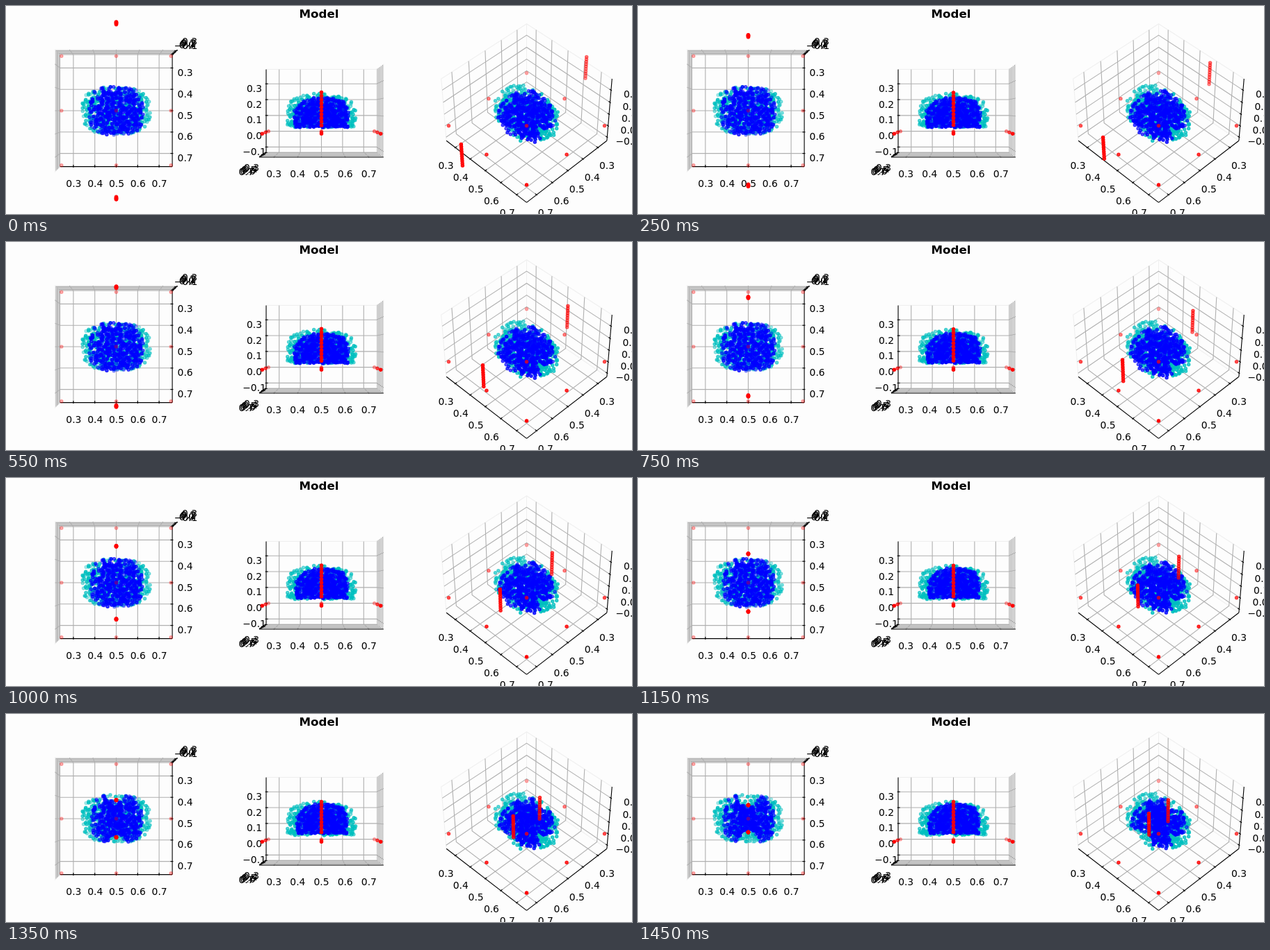
These frames come from a looping animation (900 px wide and 300 px high, 1500 ms). An HTML page with a canvas:

```html
<!DOCTYPE html>
<html lang="en">
<head>
<meta charset="utf-8">
<title>Model</title>
<style>
  html, body { margin: 0; width: 100%; height: 100%; overflow: hidden; background: #fdfdfd; }
  canvas { display: block; }
</style>
</head>
<body>
<canvas id="stage" width="900" height="300"></canvas>
<script>
const ctx = document.getElementById('stage').getContext('2d');
const STEP_MS = 50, STEPS = 30;
const FOCAL = 1438, DISTANCE = 10, SCALE = 2.237;
const CENTER = [0.5, 0.5, 0.13], HALF = 0.2615;
const LOW = CENTER.map(c => c - HALF), HIGH = CENTER.map(c => c + HALF);
const TICKS = [[0.3, 0.4, 0.5, 0.6, 0.7], [0.3, 0.4, 0.5, 0.6, 0.7], [-0.1, 0, 0.1, 0.2, 0.3]];
const X = 0, Y = 1, Z = 2;

// wallY: side wall holding the grid; labels: offset of x, y and z tick labels
const views = [
  { cx: 158.5, elev: 90, azim: 0, wallY: LOW[Y], labels: [[18.5, 6.5], [0.5, 24], [19, -13]] },
  { cx: 453.5, elev: 0, azim: 0, wallY: HIGH[Y], labels: [[-20, 22], [0, 24], [-17, 6.5]] },
  { cx: 748.5, elev: 45, azim: 45, wallY: LOW[Y], labels: [[13, 26], [-13.5, 26], [29, 6]] },
];

// Returns [screen x, screen y, depth]
function project(view, p) {
  const e = view.elev * Math.PI / 180, a = view.azim * Math.PI / 180;
  const u = (p[X] - CENTER[X]) * SCALE;
  const v = (p[Y] - CENTER[Y]) * SCALE;
  const w = (p[Z] - CENTER[Z]) * SCALE * 0.75;
  const right = v * Math.cos(a) - u * Math.sin(a);
  const front = u * Math.cos(a) + v * Math.sin(a);
  const up = w * Math.cos(e) - front * Math.sin(e);
  const depth = DISTANCE - front * Math.cos(e) - w * Math.sin(e);
  return [view.cx + FOCAL * right / depth, 151 - FOCAL * up / depth, depth];
}

function line(view, color, ...points) {
  ctx.beginPath();
  for (const p of points) ctx.lineTo(...project(view, p).slice(0, 2));
  ctx.strokeStyle = color;
  ctx.lineWidth = 1.11;
  ctx.stroke();
}

function withCoord(p, axis, value) {
  const q = [...p];
  q[axis] = value;
  return q;
}

function drawAxes(view) {
  const wall = view.wallY, open = LOW[Y] + HIGH[Y] - wall;
  const [x0, , z0] = LOW, [x1, , z1] = HIGH;

  line(view, '#f0f0f0', [x1, wall, z0], [x1, wall, z1], [x0, wall, z1], [x0, open, z1]);
  line(view, '#f0f0f0', [x0, open, z0], [x0, wall, z0], [x0, wall, z1]);

  for (const x of TICKS[X]) line(view, '#b0b0b0', [x, open, z0], [x, wall, z0], [x, wall, z1]);
  for (const y of TICKS[Y]) line(view, '#b0b0b0', [x1, y, z0], [x0, y, z0], [x0, y, z1]);
  for (const z of TICKS[Z]) line(view, '#b0b0b0', [x1, wall, z], [x0, wall, z], [x0, open, z]);

  // Starting corner of each axis line and the direction of its ticks
  const axes = [
    { start: [x0, open, z0], across: Y },
    { start: [x1, LOW[Y], z0], across: X },
    { start: [x0, open, z0], across: Y },
  ];
  ctx.font = '13.89px "DejaVu Sans", sans-serif';
  ctx.textAlign = 'center';
  axes.forEach(({ start, across }, axis) => {
    line(view, '#000', start, withCoord(start, axis, HIGH[axis]));
    const outward = Math.sign(start[across] - CENTER[across]);
    for (const value of TICKS[axis]) {
      const p = withCoord(start, axis, value);
      line(view, '#000',
        withCoord(p, across, p[across] + outward * 0.0044),
        withCoord(p, across, p[across] - outward * 0.0087));
      const [sx, sy] = project(view, p), [dx, dy] = view.labels[axis];
      ctx.fillStyle = '#000';
      ctx.fillText(value.toFixed(1).replace('-', '\u2212'), sx + dx, sy + dy + 5);
    }
  });
}

// Dots fade with depth and are painted from back to front
function scatter(view, points, color) {
  const dots = points.map(p => project(view, p)).sort((a, b) => b[2] - a[2]);
  const far = dots[0][2], near = dots[dots.length - 1][2];
  ctx.fillStyle = ctx.strokeStyle = color;
  ctx.lineWidth = 1.3;
  for (const [x, y, depth] of dots) {
    ctx.globalAlpha = 0.3 + 0.7 * (far - depth) / (far - near);
    ctx.beginPath();
    ctx.arc(x, y, 2.1, 0, 2 * Math.PI);
    ctx.fill();
    ctx.stroke();
  }
  ctx.globalAlpha = 1;
}

let seed = 7;
function random() {
  seed = (seed * 1664525 + 1013904223) % 4294967296;
  return seed / 4294967296;
}

// Random points in a flat-bottomed rounded block
function block(count, radiusX, radiusY, bottom, top, power) {
  const points = [];
  while (points.length < count) {
    const a = random() * 2 - 1, b = random() * 2 - 1, c = random();
    if (Math.abs(a) ** power + Math.abs(b) ** power + c ** 4 > 1) continue;
    points.push([0.5 + a * radiusX, 0.5 + b * radiusY, bottom + c * (top - bottom)]);
  }
  return points;
}

const BODY_X = 0.112;
const shell = block(500, 0.11, 0.16, 0.032, 0.237, 2.6);
const body = block(520, BODY_X, 0.124, 0.032, 0.213, 3);

const base = [];
for (const x of [0.25, 0.5, 0.75])
  for (const y of [0.25, 0.5, 0.75]) base.push([x, y, 0]);

// The body tightens slightly, then dents where the fingers press
function squeeze(reach, step) {
  const k = Math.min(1, Math.max(0, (step - 12) / 13));
  return body.map(([x, y, z]) => {
    const ny = 0.5 + (y - 0.5) * (1 - 0.07 * k) + 0.003 * k;
    const room = reach - 0.008 + 20 * (ny - 0.5) ** 2;
    return [0.5 + (x - 0.5) * Math.min(1, room / BODY_X), ny, z + 0.01 * k];
  });
}

function fingers(reach) {
  const points = [];
  for (const side of [-1, 1])
    for (let i = 0; i < 10; i++) points.push([0.5 + side * reach, 0.5, 0.05 + 0.02 * i]);
  return points;
}

function draw(step) {
  const reach = 0.391 - 0.0114 * step;
  const soft = squeeze(reach, step), grip = [...base, ...fingers(reach)];
  ctx.fillStyle = '#fdfdfd';
  ctx.fillRect(0, 0, 900, 300);
  for (const view of views) {
    drawAxes(view);
    scatter(view, shell, '#00bfbf');
    scatter(view, soft, '#00f');
    scatter(view, grip, '#f00');
  }
  ctx.fillStyle = '#000';
  ctx.font = 'bold 16.67px "DejaVu Sans", sans-serif';
  ctx.fillText('Model', 450, 16.5);
}

let shown = -1;
function tick() {
  const step = Math.floor(performance.now() / STEP_MS) % STEPS;
  if (step !== shown) draw(shown = step);
  requestAnimationFrame(tick);
}
tick();
</script>
</body>
</html>
```
